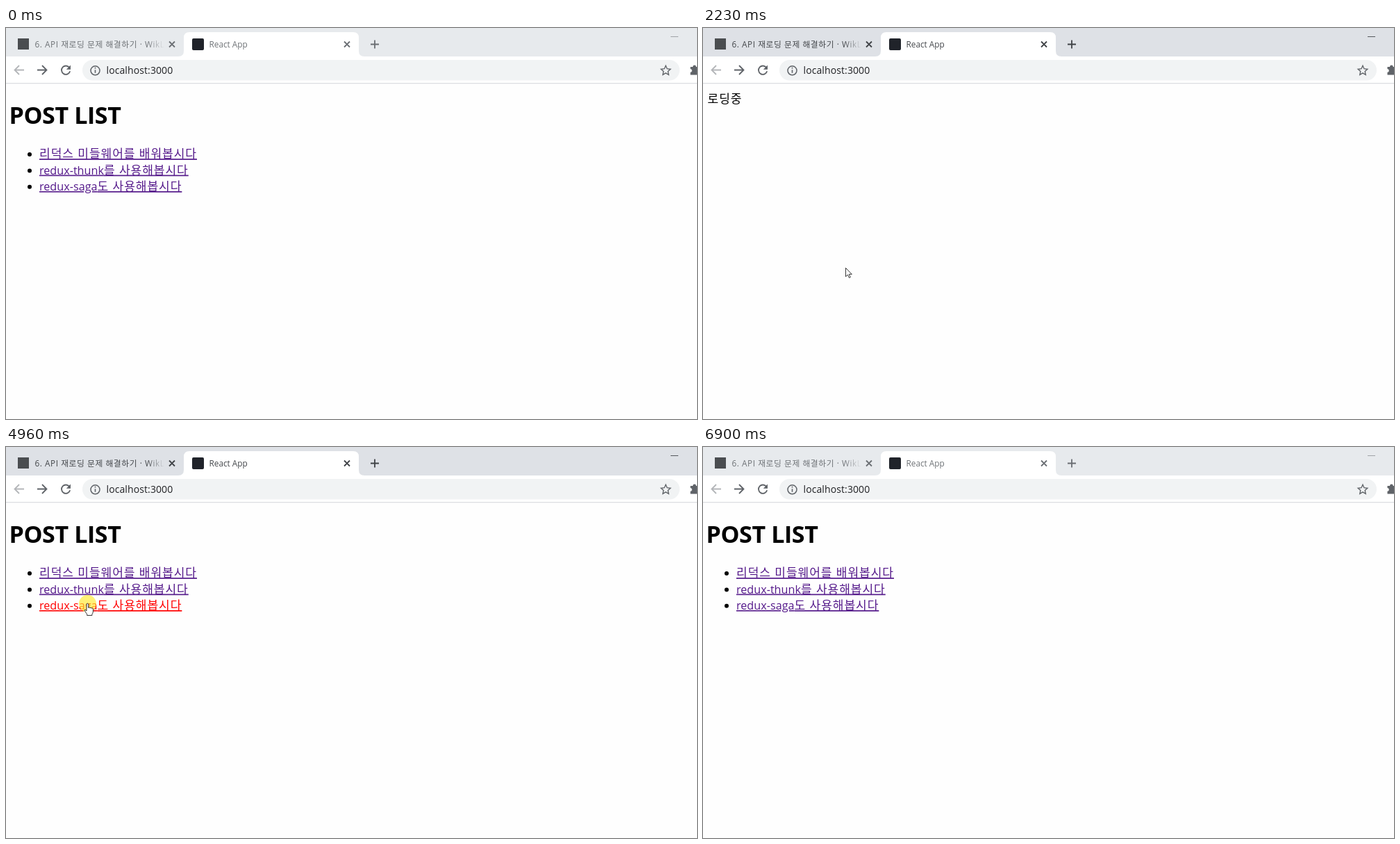
Animation of 995x563 px, one loop 7.06 s. Source, as an HTML page:

```html
<!DOCTYPE html>
<html lang="ko">
<head>
<meta charset="utf-8">
<title>React App</title>
<style>
html, body { margin: 0; width: 100%; height: 100%; overflow: hidden; background: #fefefe; }
svg { display: block; }
text { font: 16.2px "Open Sans", "Noto Sans CJK KR", "Noto Sans CJK JP", "Noto Sans CJK", sans-serif; white-space: pre; }
.ko { font-size: 1.055em; font-weight: 300; letter-spacing: .054em; }
.h1 { font-size: 34px; font-weight: 700; letter-spacing: -.4px; }
.h1 .ko { font-weight: 700; letter-spacing: .015em; }
.tab { font-size: 11.8px; fill: #6f7377; }
.url { font-size: 14px; letter-spacing: .1px; fill: #202124; }
.link { fill: #551a8b; text-decoration: underline; text-decoration-thickness: 1.3px; text-underline-offset: 2.6px; text-decoration-skip-ink: none; }
.link.red { fill: #f00; }
.line { fill: none; stroke: #5f6368; stroke-width: 1.8; }
.bar { fill: #e7eaed; }
.fade stop { stop-color: #e7eaed; }
.top { stroke: #6a6e73; }
.min { stroke: #a0a3a7; stroke-width: 1; }
.focus .bar { fill: #dee1e6; }
.focus .fade stop { stop-color: #dee1e6; }
.focus .tab { fill: #45484c; }
.focus .top { stroke: #3f4246; }
.focus .min { stroke: #55585c; }
.off { stroke: #b4b6b9; }
</style>
</head>
<body>
<svg id="stage" width="995" height="563" viewBox="0 0 995 563">
  <defs>
    <linearGradient id="fade" class="fade">
      <stop offset="0" stop-opacity="0"/><stop offset="1"/>
    </linearGradient>
  </defs>
  <rect width="995" height="563" fill="#fefefe"/>

  <!-- tab strip -->
  <rect class="bar" width="995" height="41"/>
  <path d="M248 41q8 0 8-8V14q0-8 8-8H500q8 0 8 8V33q0 8 8 8z" fill="#fff"/>
  <rect x="17" y="15" width="16" height="16" fill="#4a4d50"/>
  <text class="tab" x="41.500" y="27.500" letter-spacing=".55">6. API 재로딩 문제 해결하기 · WikLo</text>
  <rect x="203" y="10" width="25" height="28" fill="url(#fade)"/>
  <rect class="bar" x="227.500" y="10" width="20" height="28"/>
  <rect x="268" y="15" width="17" height="17" rx="2" fill="#20232a"/>
  <text class="tab" x="292.500" y="27.500">React App</text>
  <path class="line top" d="M235 19.500l8 8m0-8l-8 8M487 19.500l8 8m0-8l-8 8M525 23.500h12m-6-6v12"/>
  <path class="line top min" d="M957 12.500h11"/>

  <!-- toolbar -->
  <rect y="41" width="995" height="38" fill="#fff"/>
  <rect y="79" width="995" height="1.300" fill="#dcdee1"/>
  <rect x="110" y="46" width="860" height="29.500" rx="14.700" fill="#f1f3f4"/>
  <path class="line" id="back" d="M26 60.500H12.500m6.500-6.500l-6.500 6.500l6.500 6.500"/>
  <path class="line" id="next" d="M45 60.500H58.500m-6.500-6.500l6.500 6.500l-6.500 6.500"/>
  <path class="line" d="M91.400 57.300a6.200 6.200 0 1 0 .8 5"/>
  <path d="M93 53.500v6.200h-6.200z" fill="#5f6368"/>
  <circle class="line" cx="128.500" cy="61.300" r="6.500" style="stroke-width:1.5"/>
  <path class="line" d="M128.500 60.300v4.500m0-8v1.700" style="stroke-width:1.6"/>
  <text class="url" x="144.500" y="66"><tspan>localhost:3000</tspan><tspan id="path" fill="#5f6368"></tspan></text>
  <path class="line" style="stroke-width:1.4" d="M950 54.200l2 4.500l4.800.5l-3.600 3.300l1 4.800l-4.200-2.500l-4.200 2.500l1-4.800l-3.600-3.300l4.800-.5z"/>
  <path d="M985.500 56h3.500a2.400 2.400 0 0 1 4.800 0H999V67.500H985.500v-3.800a2.300 2.300 0 0 0 0-4.600z" fill="#5f6368"/>

  <!-- page -->
  <text id="loading" x="6.500" y="108.300"></text>
  <g id="list">
    <text class="h1" x="4.500" y="138.300">POST LIST</text>
  </g>
  <g id="post">
    <text class="h1" id="title" x="5.500" y="138.300"></text>
    <text id="text" x="6.500" y="187"></text>
  </g>

  <g id="cursor">
    <circle id="press" r="12.500" fill="#ffe92e" opacity=".65"/>
    <path id="arrow" d="M.5.5V13l2.900-2.700l2 4.400l1.900-.8l-2-4.300h4z" fill="#fff" stroke="#222" stroke-width=".9"/>
    <path id="hand" d="M-1.500 8.500V.5q1.300-1.700 2.600 0V6q1.300-1.200 2.300.2q1.400-1 2.300.4q1.700-.6 2.200 1.200V11.500q0 2-1.500 3.800V17H-.8V15.300L-4.800 9.500q.8-2 3.300 1z" fill="#fff" stroke="#222" stroke-width=".9"/>
  </g>
</svg>
<script>
const LOOP = 7060;
const $ = id => document.getElementById(id);
const show = (id, on) => $(id).style.display = on ? '' : 'none';

const posts = [
  ['리덕스 미들웨어를 배워봅시다', '리덕스 미들웨어를 직접 만들어보면 이해하기 쉽죠.'],
  ['redux-thunk를 사용해봅시다', 'redux-thunk를 사용해서 비동기 작업을 처리해봅시다!'],
  ['redux-saga도 사용해봅시다', '나중엔 redux-saga를 사용해서 비동기 작업을 처리하는 방법도 배워볼 거예요.']
];

// One visit per post: mouse down, request, post shown, back, list shown
const visits = [
  [1140, 1290, 1830, 2230, 2780],
  [3080, 3170, 3640, 4100, 4570],
  [4960, 5120, 5580, 5970, 6520]
];

// Cursor moves: first step, last step, number of steps, end x, end y
const moves = [
  [300, 300, 1, 284, 466],
  [370, 370, 1, 229, 440],
  [530, 990, 7, 127, 181],
  [1370, 1750, 6, 201, 359],
  [1830, 1910, 2, 203, 345],
  [2000, 2000, 1, 205, 345],
  [2310, 2610, 5, 117.5, 203.5],
  [3310, 3470, 3, 171, 330],
  [4180, 4570, 6, 118.5, 225],
  [4880, 4880, 1, 117.5, 225.5],
  [5200, 5580, 6, 283, 403],
  [5750, 5820, 2, 279, 401],
  [5970, 6070, 2, 276, 401],
  [6120, 6290, 3, 290, 541]
];

const rowY = i => 182 + 23.4 * i;

function add(parent, tag, attrs, text = '') {
  const el = document.createElementNS('http://www.w3.org/2000/svg', tag);
  for (const key in attrs) el.setAttribute(key, attrs[key]);
  el.textContent = text;
  parent.append(el);
  return el;
}

// Hangul runs get their own size and spacing
function write(el, text) {
  if (el.textContent === text) return;
  el.textContent = '';
  text.split(/([가-힣]+(?: [가-힣]+)*)/).forEach((run, i) => {
    if (run) add(el, 'tspan', { class: i % 2 ? 'ko' : 'latin' }, run);
  });
}

const links = posts.map(([title], i) => {
  add($('list'), 'circle', { cx: 34, cy: rowY(i), r: 3 });
  const link = add($('list'), 'text', { class: 'link', x: 48, y: rowY(i) + 5.2 });
  write(link, title);
  return link;
});

function cursorAt(t) {
  let x = 284, y = 466;
  for (const [start, end, steps, toX, toY] of moves) {
    if (t < start) break;
    const gap = (end - start) / (steps - 1) || 1;
    const part = Math.min(steps, Math.floor((t - start) / gap + 1e-6) + 1) / steps;
    const ease = part * part * (3 - 2 * part);
    x += (toX - x) * ease;
    y += (toY - y) * ease;
  }
  return [x, y];
}

function pageAt(t) {
  for (let i = 0; i < visits.length; i++) {
    const [down, request, shown, back, listed] = visits[i];
    if (t < down) return { list: true };
    if (t < request) return { list: true, pressed: i };
    if (t < shown) return { path: i + 1, loading: '로딩중...' };
    if (t < back) return { path: i + 1, post: posts[i] };
    if (t < listed) return { loading: '로딩중' };
  }
  return { list: true };
}

function draw(t) {
  const page = pageAt(t);
  const [x, y] = cursorAt(t);
  const over = page.list && x > 48 && x < 276 && links.some((_, i) => Math.abs(y - rowY(i)) < 11);

  $('stage').classList.toggle('focus', t >= visits[0][0] && t < 6900);
  $('back').classList.toggle('off', !page.path);
  $('next').classList.toggle('off', !!page.path);
  $('path').textContent = page.path ? '/' + page.path : '';

  const [title, text] = page.post || ['', ''];
  write($('loading'), page.loading || '');
  write($('title'), title);
  write($('text'), text);
  show('list', page.list);
  show('post', page.post);
  links.forEach((link, i) => link.classList.toggle('red', page.pressed === i));

  show('cursor', t >= 300 && t < 6360);
  $('cursor').setAttribute('transform', `translate(${x} ${y})`);
  show('press', page.pressed !== undefined);
  show('hand', over);
  show('arrow', !over);
}

const begin = performance.now();
function tick() {
  draw((performance.now() - begin) % LOOP);
  requestAnimationFrame(tick);
}
tick();
</script>
</body>
</html>
```
